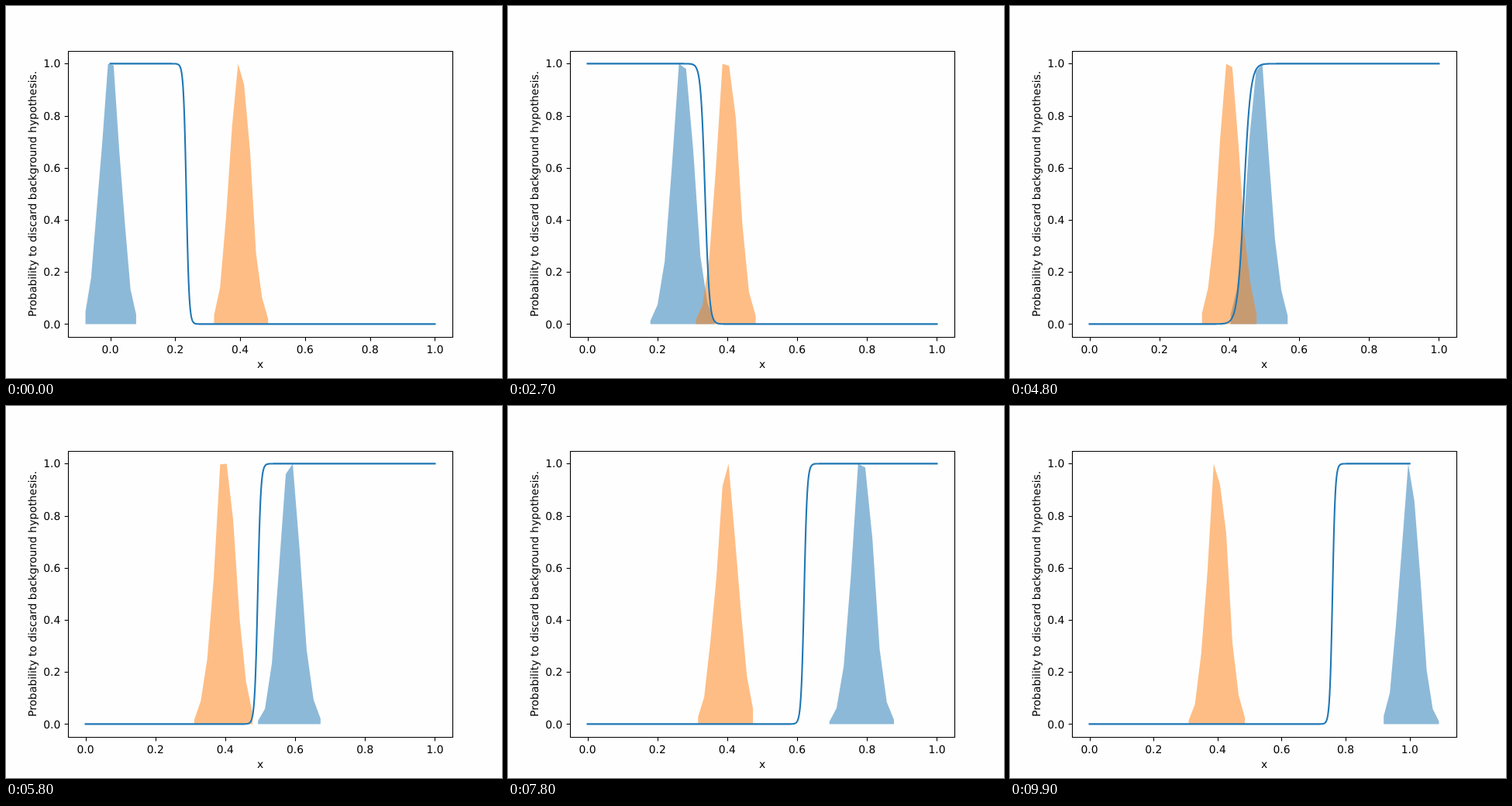
These frames come from a looping animation (640x480 px, 10 s). An HTML page:

```html
<!DOCTYPE html>
<html lang="en">
<head>
<meta charset="utf-8">
<title>Background rejection</title>
<style>
  html, body { margin: 0; width: 100%; height: 100%; overflow: hidden; background: #fefefe; }
  svg { display: block; width: 640px; height: 480px; }
  text {
    font: 13.89px "DejaVu Sans", Verdana, sans-serif;
    text-anchor: middle;
    text-rendering: geometricPrecision;
  }
  #yticks text { text-anchor: end; }
  .axis { stroke: #000; stroke-width: 1.11; fill: none; }
  #curve { fill: none; stroke: #1f77b4; stroke-width: 2.08; stroke-linejoin: round; stroke-linecap: square; }
</style>
</head>
<body>
<svg viewBox="0 0 640 480">
  <path id="signal" fill="#1f77b4" fill-opacity=".5"/>
  <path id="noise" fill="#ff7f0e" fill-opacity=".5"/>
  <path id="curve"/>
  <g id="xticks"></g>
  <g id="yticks"></g>
  <path class="axis" stroke-linecap="square" d="M80.5 58.5H576.5V427.5H80.5Z"/>
  <text x="328" y="467">x</text>
  <text transform="translate(39 242.4) rotate(-90)">Probability to discard background hypothesis.</text>
</svg>
<script>
const STEPS = 100, STEP_MS = 100, BINS = 10;
const CENTER = 0.4, SIGMA = 0.031, REACH = 0.086;
const LEFT = 102.55, RIGHT = 553.45, TOP = 74.4, BOTTOM = 410.4;

// Log-odds of the unsure classifier while both peaks coincide: [x, value].
const unsure = [
  [0, -.33], [.253, 2.31], [.355, 1.2], [.388, -.04], [.395, -.6], [.408, -.6],
  [.427, -1.73], [.495, -1.54], [.543, -1.7], [.597, -1], [1, 1.78]
];
const UNSURE_STEP = 38;

const byId = id => document.getElementById(id);
const sy = p => BOTTOM - p * (BOTTOM - TOP);
const snap = v => Math.floor(v + .5) + .5;

function lerp(points, x) {
  let i = 1;
  while (i < points.length - 1 && x > points[i][0]) i++;
  const [x0, y0] = points[i - 1], [x1, y1] = points[i];
  return y0 + (y1 - y0) * (x - x0) / (x1 - x0);
}

// Seeded noise between -1 and 1.
function jitter(seed) {
  return () => {
    seed = seed + 0x6d2b79f5 | 0;
    let t = Math.imul(seed ^ seed >>> 15, 1 | seed);
    t = t + Math.imul(t ^ t >>> 7, 61 | t) ^ t;
    return ((t ^ t >>> 14) >>> 0) / 2147483648 - 1;
  };
}

// Noisy bell-shaped histogram, scaled to a peak of 1.
function histogram(mean, seed) {
  const rnd = jitter(seed);
  const middle = mean + .006 * rnd(), half = REACH + .008 * rnd();
  const bins = Array.from({ length: BINS }, (_, i) => {
    const x = middle + half * (2 * i / (BINS - 1) - 1);
    return { x, h: Math.exp(-(((x - mean) / SIGMA) ** 2) / 2) * (1 + .1 * rnd()) };
  });
  const peak = Math.max(...bins.map(b => b.h));
  return bins.map(({ x, h }) => ({ x, h: h / peak }));
}

function area(bins, sx) {
  const tops = bins.map(({ x, h }) => `L${sx(x).toFixed(2)} ${sy(h).toFixed(2)}`);
  return `M${sx(bins[0].x)} ${BOTTOM}${tops.join("")}L${sx(bins[BINS - 1].x)} ${BOTTOM}Z`;
}

function curve(step, mean, sx) {
  const gap = mean - CENTER, side = Math.sign(gap);
  const slope = side * Math.min(230, Math.abs(gap) * 1300);
  const border = (mean + CENTER) / 2 + .155 * Math.max(0, Math.abs(gap - .02) - .2);
  const mix = Math.exp(-(((step - UNSURE_STEP) / 5) ** 2));
  let d = "";
  for (let i = 0; i <= 800; i++) {
    const x = i / 800;
    const z = (1 - mix) * slope * (x - border) - mix * side * lerp(unsure, x);
    d += `${i ? "L" : "M"}${sx(x).toFixed(2)} ${sy(1 / (1 + Math.exp(-z))).toFixed(2)}`;
  }
  return d;
}

function build(step) {
  const mean = step / (STEPS - 1);
  const signal = histogram(mean, step * 2 + 1);
  const noise = histogram(CENTER, step * 2 + 2);
  const lo = Math.min(0, signal[0].x), hi = Math.max(1, signal[BINS - 1].x);
  const sx = x => LEFT + (x - lo) / (hi - lo) * (RIGHT - LEFT);
  return { sx, signal: area(signal, sx), noise: area(noise, sx), curve: curve(step, mean, sx) };
}

const labels = Array.from({ length: 6 }, (_, i) => i / 5);
byId("yticks").innerHTML = labels.map(v =>
  `<path class="axis" d="M75.6 ${snap(sy(v))}H80.5"/><text x="70.3" y="${Math.round(sy(v) + 5.1)}">${v.toFixed(1)}</text>`).join("");
byId("xticks").innerHTML = labels.map(v =>
  `<g><path class="axis" d="M0 427.5V432.4"/><text y="448">${v.toFixed(1)}</text></g>`).join("");
const xticks = [...byId("xticks").children];

const scenes = Array.from({ length: STEPS }, (_, i) => build(i));
let shown = -1;

function draw(step) {
  const scene = scenes[step];
  for (const id of ["signal", "noise", "curve"]) byId(id).setAttribute("d", scene[id]);
  xticks.forEach((tick, i) => {
    const x = scene.sx(labels[i]);
    tick.firstChild.setAttribute("transform", `translate(${snap(x)} 0)`);
    tick.lastChild.setAttribute("x", x);
  });
}

const start = performance.now();
function tick() {
  const step = Math.floor(Math.max(0, performance.now() - start) / STEP_MS) % STEPS;
  if (step !== shown) draw(shown = step);
  requestAnimationFrame(tick);
}
tick();
</script>
</body>
</html>
```
